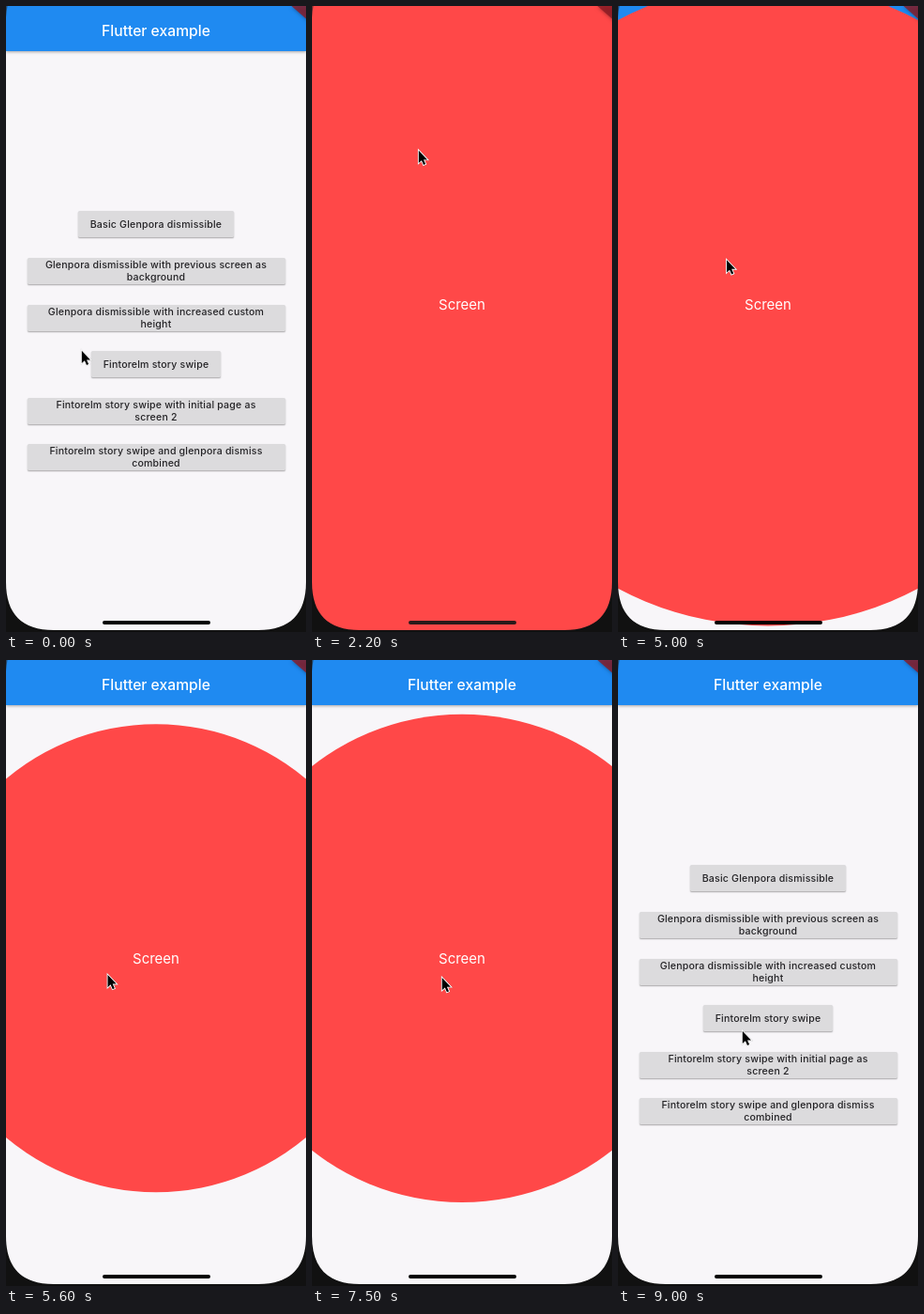
Write an HTML page that moves like this. It is 320 px wide and 666 px high and loops after 9.9 s.

```html
<!DOCTYPE html>
<html lang="en">
<head>
<meta charset="utf-8">
<title>Swipe to dismiss</title>
<style>
  html, body { margin: 0; width: 100%; height: 100%; overflow: hidden; background: #111; }
  #stage {
    position: relative; width: 320px; height: 666px; overflow: hidden;
    background: #f8f6f9; font-family: Inter, Roboto, sans-serif;
  }
  #stage > * { position: absolute; }
  header {
    left: 0; top: 0; width: 320px; height: 48px; padding-top: 3px; box-sizing: border-box;
    background: #1f8af1; color: #fff; font: 500 15.7px/47px Inter, Roboto, sans-serif;
    text-align: center; box-shadow: 0 1px 3px rgba(0, 0, 0, .34);
  }
  #list {
    inset: 218.4px 0 auto; display: flex; flex-direction: column;
    align-items: center; gap: 21.6px;
  }
  #list div {
    box-sizing: border-box; max-width: 275px; height: 28px; padding: 0 12.4px;
    display: flex; align-items: center; justify-content: center;
    background: #dcdbdd; color: #242326; border-radius: 1.5px;
    box-shadow: 0 1px 1.5px rgba(0, 0, 0, .32);
    font-size: 10.6px; font-weight: 500; line-height: 13px; letter-spacing: .18px;
    text-align: center; white-space: pre;
  }
  #list .wide { width: 275px; }
  #page {
    inset: 0; background: #ff4848; color: #fff;
    font-size: 15px; line-height: 20px; text-align: center;
  }
  #page span { position: absolute; left: 0; right: 0; top: 307.5px; }
  #bar { left: 103px; top: 654px; width: 115px; height: 4px; border-radius: 2px; }
  svg { left: 0; top: 0; overflow: visible; }
</style>
</head>
<body>
<div id="stage">
  <header>Flutter example</header>
  <div id="list"></div>
  <div id="page"><span>Screen</span></div>
  <div id="bar"></div>
  <svg width="320" height="666">
    <path d="M304.5 0H324V17Z" fill="#8c1a24" fill-opacity=".8"
          style="filter: drop-shadow(0 0 2px rgba(0,0,0,.5))"/>
    <path d="M0 0H1.5Q.6 5 0 12Z" fill="#222" fill-opacity=".6"/>
    <path d="M0 613C0 647 17 664 51 664H269C303 664 320 647 320 613V666H0Z" fill="#111"/>
    <path id="cursor" d="M.8 .8V14L3.9 11.2L6 16L8.1 15.1L6 10.4H10Z"
          fill="#000" stroke="#fff" stroke-width="1.8" paint-order="stroke"
          style="filter: drop-shadow(0 .6px .6px rgba(0,0,0,.35))"/>
  </svg>
</div>
<script>
  const LOOP = 9900, STEP = 100;
  const FULL = 440, SHRINK = 1.44;

  const $ = id => document.getElementById(id);
  const page = $('page'), bar = $('bar'), cursor = $('cursor');

  const labels = [
    'Basic Glenpora dismissible',
    'Glenpora dismissible with previous screen as\nbackground',
    'Glenpora dismissible with increased custom\nheight',
    'Fintorelm story swipe',
    'Fintorelm story swipe with initial page as\nscreen 2',
    'Fintorelm story swipe and glenpora dismiss\ncombined'
  ];
  for (const text of labels) {
    const button = document.createElement('div');
    button.textContent = text;
    button.classList.toggle('wide', text.includes('\n'));
    $('list').append(button);
  }

  // Pointer moves; one with a release time drags the page
  const home = { x: 80, y: 366 };
  const moves = [
    { from: 0, to: 400, x: 77, y: 332 },
    { from: 1200, to: 2000, x: 113, y: 153 },
    { from: 2200, to: 4000, x: 118, y: 279, release: 4200 },
    { from: 4400, to: 4680, x: 123, y: 201.5 },
    { from: 4680, to: 6400, x: 106, y: 349, release: 6500 },
    { from: 6700, to: 7120, x: 151, y: 212 },
    { from: 7120, to: 8300, x: 132, y: 394, release: LOOP }
  ];

  const ramp = (t, a, b) => Math.min(1, Math.max(0, (t - a) / (b - a)));
  const easeOut = u => 1 - (1 - u) ** 3;
  const mix = (a, b, k) => a + (b - a) * k;

  function draw(t) {
    const i = moves.findLastIndex(m => t >= m.from);
    const move = moves[i], prev = moves[i - 1] || home;
    const k = easeOut(ramp(t, move.from, move.to));
    const x = mix(prev.x, move.x, k), y = mix(prev.y, move.y, k);
    cursor.setAttribute('transform', `translate(${x} ${y})`);

    const r = t < move.release ? FULL - SHRINK * (y - prev.y) : FULL;
    const alpha = ramp(t, 1300, 1700) - ramp(t, 8200, 8500);
    page.style.clipPath = `circle(${r}px at 160px 317.3px)`;
    page.style.opacity = alpha;
    bar.style.background = alpha > .5 && r > 350 ? '#2a1a1a' : '#000';
  }

  const start = performance.now();
  function tick() {
    const t = (performance.now() - start) % LOOP;
    draw(Math.floor(t / STEP) * STEP);
    requestAnimationFrame(tick);
  }
  tick();
</script>
</body>
</html>
```
